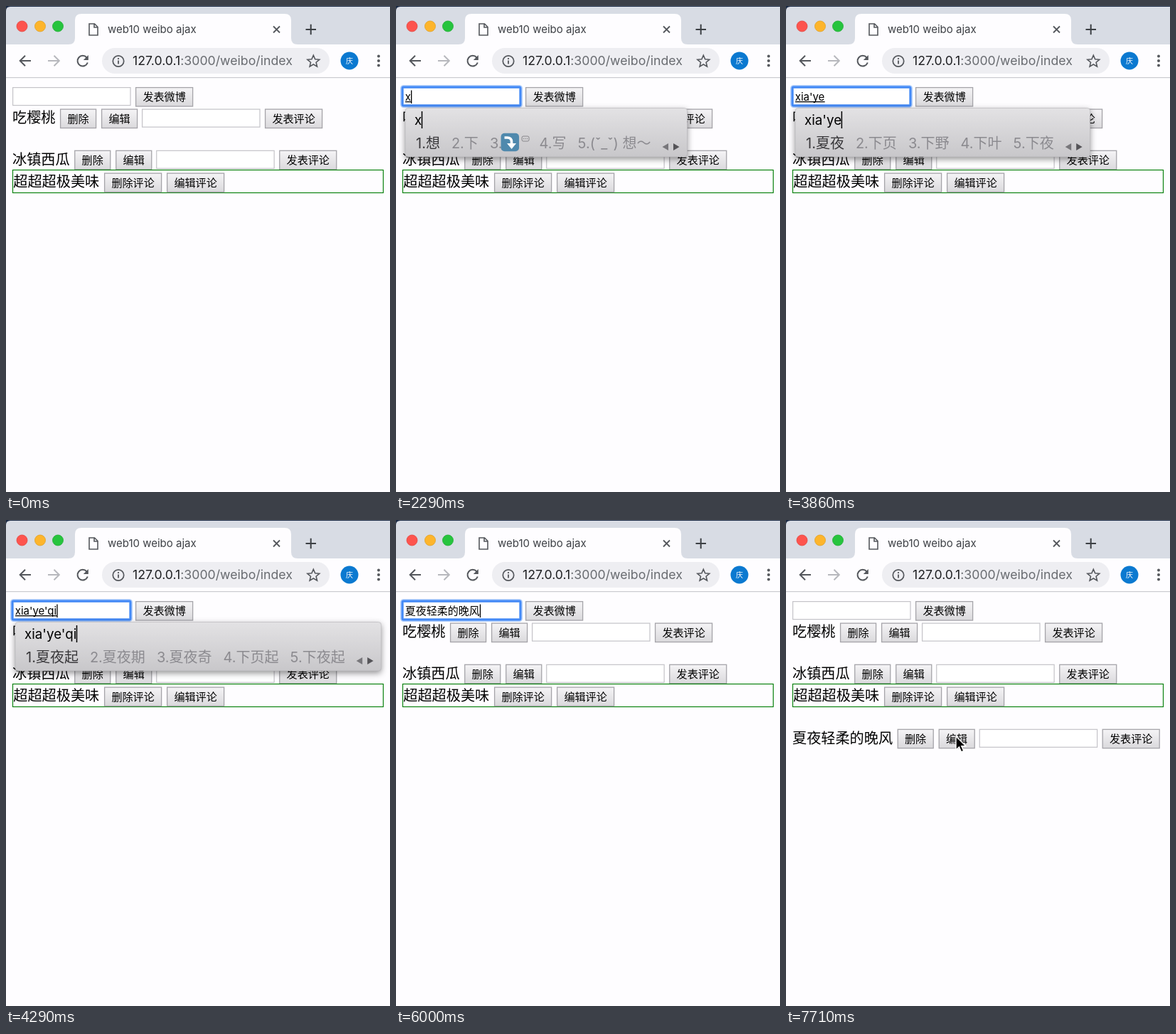
Animation of 540 by 683 pixels, one loop 8000 ms. Source, as an HTML page:

```html
<!DOCTYPE html>
<html lang="zh-CN">
<head>
<meta charset="utf-8">
<title>web10 weibo ajax</title>
<style>
  html, body { margin: 0; width: 100%; height: 100%; overflow: hidden; background: #fefdff; }
  svg { display: block; width: 100vw; height: 100vh; }
  text {
    font-family: Inter, "Noto Sans CJK SC", "Noto Sans CJK", sans-serif;
    font-feature-settings: "calt" 0;
    white-space: pre;
  }
  .post { font-weight: 500; }
  .icon { fill: none; stroke: #54575c; stroke-width: 2; }
  #popup { filter: drop-shadow(0 3px 4px rgba(0, 0, 0, .42)); }
</style>
</head>
<body>
<svg id="stage" viewBox="0 0 540 683" preserveAspectRatio="none">
  <defs>
    <linearGradient id="face" x2="0" y2="1">
      <stop stop-color="#f5f4f6"/><stop offset="1" stop-color="#dad9dc"/>
    </linearGradient>
    <linearGradient id="pressed" x2="0" y2="1">
      <stop stop-color="#d2d1d5"/><stop offset="1" stop-color="#e6e5e8"/>
    </linearGradient>
    <linearGradient id="panel" x2="0" y2="1">
      <stop stop-color="#e3e2e4"/><stop offset="1" stop-color="#c8c7ca"/>
    </linearGradient>
  </defs>

  <rect width="540" height="12" fill="#1c2b45"/>
  <path d="M0 54V7Q0 1 6 1H540V54Z" fill="#d8dce4"/>
  <path d="M88 54Q97 54 97 45V20Q97 11 106 11H392Q401 11 401 20V45Q401 54 410 54Z" fill="#fefdff"/>
  <rect y="54" width="540" height="629" fill="#fefdff"/>
  <rect y="100" width="540" height="1.2" fill="#cbcad0"/>
  <g stroke-width=".8">
    <circle cx="22.5" cy="28.5" r="7.5" fill="#fd544e" stroke="#e2443f"/>
    <circle cx="48" cy="28.5" r="7.5" fill="#fdb52c" stroke="#e0a023"/>
    <circle cx="73" cy="28.5" r="7.5" fill="#27c43e" stroke="#1fad32"/>
  </g>
  <path class="icon" style="stroke-width:1.6" d="M117 25H124.500L129 29.500V41H117ZM124 25V30H129"/>
  <path class="icon" style="stroke-width:1.8" d="M376 28.500L385 37.500M385 28.500L376 37.500"/>
  <path class="icon" style="stroke:#3c4044" d="M421.500 33H436M428.700 25.700V40.300"/>

  <path class="icon" d="M35 77H20M27 69.700L19.700 77L27 84.300"/>
  <path class="icon" style="stroke:#b7b8bd" d="M59 77H74M67.500 69.700L74.800 77L67.500 84.300"/>
  <path class="icon" d="M113.500 72.500A7.300 7.300 0 1 0 114.800 79.500"/>
  <path d="M115.800 69V76H108.800Z" fill="#54575c"/>
  <rect x="135" y="59" width="320" height="36" rx="18" fill="#eeeef2"/>
  <circle class="icon" cx="158" cy="77.500" r="7.700" style="stroke-width:1.7"/>
  <path class="icon" style="stroke-width:1.8" d="M158 76.500V81.500M158 73V75"/>
  <path id="star" class="icon" style="stroke-width:1.6"/>
  <circle cx="483" cy="77" r="12.500" fill="#0b79d0"/>
  <g fill="#54575c">
    <circle cx="524" cy="70.500" r="2"/><circle cx="524" cy="77" r="2"/><circle cx="524" cy="83.500" r="2"/>
  </g>

  <g id="page"></g>
  <g id="newPost"></g>
  <g id="field">
    <g id="ring" fill="none" stroke="#4389f6">
      <rect x="8.500" y="113.500" width="167" height="27" rx="2" stroke-width="5" opacity=".4"/>
      <rect x="9" y="114" width="166" height="26" rx="1.500" stroke-width="2.800"/>
    </g>
    <rect id="underline" x="13" y="134" height="1.300"/>
    <rect id="caret" y="118.500" width="1.300" height="18.500"/>
  </g>
  <g id="popup"></g>
  <g id="ibeam" fill="none">
    <path d="M-4 -9.500Q0 -9.500 0 -6.500Q0 -9.500 4 -9.500M0 -7V7M-4 9.500Q0 9.500 0 6.500Q0 9.500 4 9.500M-2.500 3H2.500" stroke="#fff" stroke-width="3"/>
    <path d="M-4 -9.500Q0 -9.500 0 -6.500Q0 -9.500 4 -9.500M0 -7V7M-4 9.500Q0 9.500 0 6.500Q0 9.500 4 9.500M-2.500 3H2.500" stroke="#111" stroke-width="1.400"/>
  </g>
  <path id="arrow" d="M0 0V19L4.500 15L7.500 22L10.800 20.500L7.800 13.800H13.800Z" fill="#000" stroke="#fff" stroke-width="1.400"/>
</svg>
<script>
const $ = id => document.getElementById(id);
const page = $('page'), popup = $('popup');

function add(parent, tag, attrs) {
  const node = document.createElementNS('http://www.w3.org/2000/svg', tag);
  for (const key in attrs) node.setAttribute(key, attrs[key]);
  return parent.appendChild(node);
}
function label(parent, x, y, size, content, fill = '#000') {
  const node = add(parent, 'text', { x, y, 'font-size': size, fill });
  node.textContent = content;
  return node;
}
const show = (node, on) => node.style.display = on ? '' : 'none';

// Page widgets
function button(parent, x, y, content) {
  const width = content.length * 15 + 20;
  const face = add(parent, 'rect', { x: x + .6, y: y + .6, width, height: 26.4, fill: 'url(#face)', stroke: '#a5a4a9', 'stroke-width': 1.3 });
  label(parent, x + 10.4, y + 19.3, 15.1, content);
  return face;
}
function input(parent, x, y) {
  add(parent, 'rect', { x: x + .6, y: y + .6, width: 165.4, height: 25, fill: '#fff', stroke: '#c4c3c8', 'stroke-width': 1.2 });
}
function message(parent, x, y, content) {
  label(parent, x, y, 20.16, content).setAttribute('class', 'post');
}
function post(parent, y, content) {
  const x = 15.5 + content.length * 20.16;
  message(parent, 9, y + 19.8, content);
  button(parent, x, y, '删除');
  button(parent, x + 58, y, '编辑');
  input(parent, x + 115, y);
  button(parent, x + 288, y, '发表评论');
}

const PHRASE = '夏夜轻柔的晚风';
label(page, 143, 38.3, 15, 'web10 weibo ajax', '#3d4045');
const host = label(page, 178, 83.3, 17.7, '127.0.0.1', '#1e1f22');
label(page, 178 + host.getComputedTextLength(), 83.3, 17.7, ':3000/weibo/index', '#686b70');
label(page, 478, 80.8, 10, '庆', '#fff');
$('star').setAttribute('d', 'M' + Array.from({ length: 10 }, (_, i) => {
  const a = (i / 5 - .5) * Math.PI, r = i % 2 ? 4 : 8.8;
  return (432.3 + r * Math.cos(a)).toFixed(1) + ' ' + (78 + r * Math.sin(a)).toFixed(1);
}).join('L') + 'Z');

input(page, 9, 114);
const submit = button(page, 182, 114, '发表微博');
post(page, 144.5, '吃樱桃');
post(page, 202.7, '冰镇西瓜');
add(page, 'rect', { x: 9.5, y: 230.5, width: 521, height: 32, fill: 'none', stroke: '#0a820e', 'stroke-width': 1.2 });
message(page, 10.3, 254, '超超超极美味');
button(page, 138, 234.5, '删除评论');
button(page, 226, 234.5, '编辑评论');
post($('newPost'), 293.7, PHRASE);
const typed = label($('field'), 12.7, 133.2, 15, '');

// Time, composed letters, suggestions
const typing = [
  [2000, 'x', '想 下 ⤵ 写 (ˇ_ˇ)\u00a0想～'],
  [2430, 'xi', '西 系 洗 喜 细'],
  [2710, 'xia', '下 夏 吓 瞎 虾'],
  [3140, "xia'y", '下雨 夏夜 下一 下有 下游'],
  [3290, "xia'ye", '夏夜 下页 下野 下叶 下夜'],
  [4000, "xia'ye'q", '夏夜去 夏夜前 夏夜情 下页去 下夜去'],
  [4140, "xia'ye'qi", '夏夜起 夏夜期 夏夜奇 下页起 下夜起'],
  [4570, "xia'ye'qin", '夏夜琴 夏夜亲 夏夜侵 下页琴 下夜亲'],
  [4710, "xia'ye'qing", '夏夜情 夏夜清 夏夜轻 下页请 下夜晴'],
  [4860, "xia'ye'qing'ro", '夏夜轻柔 夏夜轻柔的晚风 夏夜 下页 下野'],
  [5000, "xia'ye'qing'rou", '夏夜轻柔 夏夜轻柔的晚风 夏夜 下页 下野']
];
const FOCUS = 1140, COMMIT = 5140, PRESS = 6710, POSTED = 6860, LOOP = 8000, TICK = 1000 / 7;

// Time, x, y
const approach = [[140, 530, 235], [430, 400, 212], [710, 215, 165], [860, 135, 138], [1000, 102.5, 128], [1999, 102.5, 128]];
const leave = [[6140, 104, 128], [6290, 130, 128], [6430, 178, 129], [6570, 220, 130], [7000, 222, 131],
  [7140, 230, 190], [7290, 246, 290], [7430, 258, 347], [7570, 250, 326], [7710, 239, 304], [LOOP, 239, 304]];

function along(path, t) {
  const i = path.findIndex(p => p[0] > t);
  if (i < 1) return null;
  const [a, b] = [path[i - 1], path[i]], k = (t - a[0]) / (b[0] - a[0]);
  return [a[1] + (b[1] - a[1]) * k, a[2] + (b[2] - a[2]) * k];
}

function arrowSuggestion(x) {
  add(popup, 'rect', { x, y: 178.7, width: 25.5, height: 25.5, rx: 5, fill: '#4f89ad' });
  add(popup, 'path', { d: `M${x + 5} 185H${x + 9}Q${x + 15} 185 ${x + 15} 191V195`, fill: 'none', stroke: '#fff', 'stroke-width': 3.6 });
  add(popup, 'path', { d: `M${x + 8.5} 193H${x + 21.5}L${x + 15} 201Z`, fill: '#fff' });
  add(popup, 'rect', { x: x + 29.5, y: 183, width: 10, height: 7, rx: 2, fill: 'none', stroke: '#88878b' });
  for (let i = 0; i < 3; i++) add(popup, 'circle', { cx: x + 32 + i * 2.5, cy: 186.5, r: .7, fill: '#88878b' });
  return 38;
}
function fillPopup(letters, words) {
  popup.replaceChildren();
  const panel = add(popup, 'rect', { x: 13, y: 143.5, height: 68.5, rx: 4, fill: 'url(#panel)', stroke: '#b4b3b7', 'stroke-width': .6 });
  const heading = label(popup, 26, 167, 18.8, letters);
  add(popup, 'rect', { x: 25.5 + heading.getComputedTextLength(), y: 148, width: 1.5, height: 24 });
  let x = 28;
  words.split(' ').forEach((word, i) => {
    const special = word === '⤵';
    const item = label(popup, x, 200.3, 20, i + 1 + '.' + (special ? '' : word), i ? '#8b8a8f' : '#38373a');
    x += item.getComputedTextLength();
    if (special) x += arrowSuggestion(x - 2) - 2;
    x += 16;
  });
  add(popup, 'path', { d: `M${x} 198L${x + 8.5} 193V203Z`, fill: '#78777b' });
  add(popup, 'path', { d: `M${x + 24} 198L${x + 15.5} 193V203Z`, fill: '#555458' });
  panel.setAttribute('width', x + 35 - 13);
}

function render(t) {
  const key = typing.filter(k => k[0] <= t).pop();
  const composing = key && t < COMMIT;
  const focused = t >= FOCUS && t < PRESS;
  show($('ring'), focused);
  show($('newPost'), t >= POSTED);
  submit.setAttribute('fill', t >= PRESS && t < POSTED ? 'url(#pressed)' : 'url(#face)');

  typed.textContent = composing ? key[1] : t >= COMMIT && t < POSTED ? PHRASE : '';
  const width = typed.textContent ? typed.getComputedTextLength() : 0;
  const lastEdit = composing ? key[0] : t >= COMMIT ? COMMIT : FOCUS;
  show($('caret'), focused && (t - lastEdit) % 860 < 428);
  $('caret').setAttribute('x', 12.8 + width);
  show($('underline'), composing);
  $('underline').setAttribute('width', width);

  show(popup, composing);
  if (composing) fillPopup(key[1], key[2]);

  const at = along(approach, t) || along(leave, t);
  const overField = at && at[0] < 176 && at[1] < 141;
  show($('ibeam'), overField);
  show($('arrow'), at && !overField);
  if (at) $(overField ? 'ibeam' : 'arrow').setAttribute('transform', `translate(${at})`);
}

let lastTick = -1;
const start = performance.now();
function loop() {
  const elapsed = (performance.now() - start) % LOOP;
  // The small lead absorbs rounding of the step times to 10 ms
  const tick = Math.floor((elapsed + 8) / TICK) % 56;
  if (tick !== lastTick) render((lastTick = tick) * TICK);
  requestAnimationFrame(loop);
}
loop();
</script>
</body>
</html>
```
